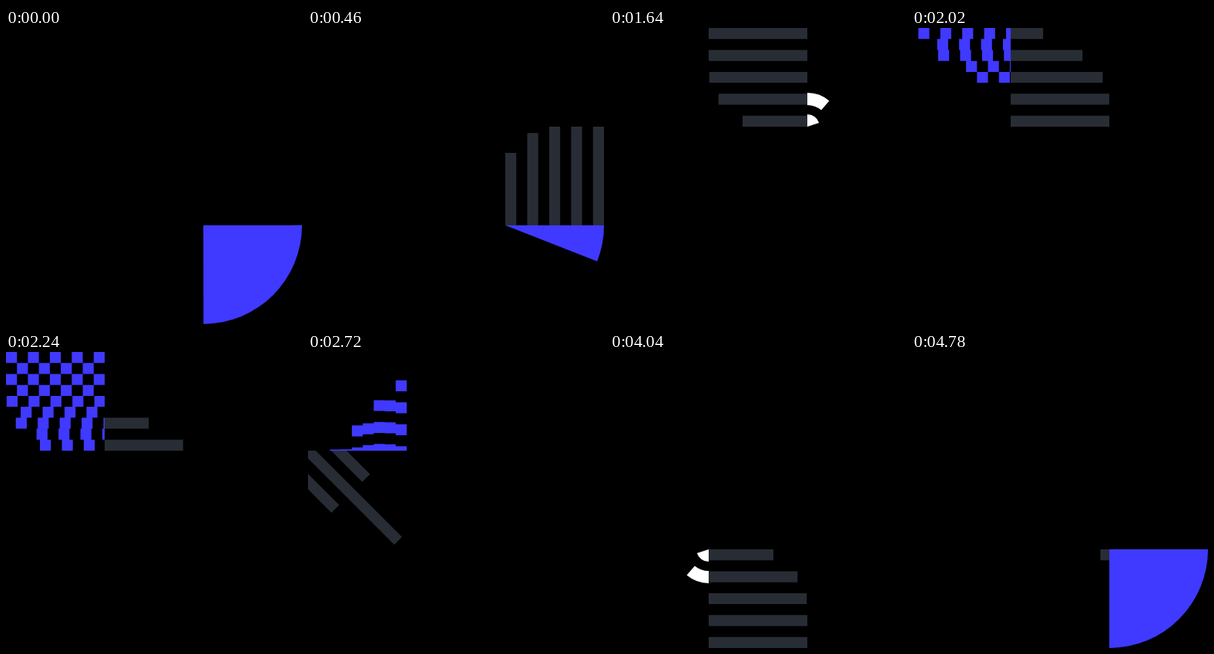
An HTML page for the animation above (4800 ms loop, 384 by 384 pixels).

```html
<!DOCTYPE html>
<html lang="en">
<head>
<meta charset="utf-8">
<title>Shape relay</title>
<style>
html, body { margin: 0; width: 100%; height: 100%; overflow: hidden; background: #000; }
svg { display: block; width: 100vw; height: 100vh; }
</style>
</head>
<body>
<svg viewBox="0 0 384 384">
  <clipPath id="cell"><rect x="0" y="128" width="128" height="128"/></clipPath>
  <path id="dark" fill="#282d35"/>
  <path id="stripes" fill="#282d35" clip-path="url(#cell)"/>
  <path id="white" fill="#fff"/>
  <path id="blue" fill="#4039ff"/>
</svg>
<script>
const LOOP = 4800, STEP = 600, SIZE = 128, UNIT = SIZE / 9, SPAN = 320;
const clamp = (v, lo, hi) => Math.min(hi, Math.max(lo, v));
const bez = (s, a, b) => 3 * (1 - s) * (1 - s) * s * a + 3 * (1 - s) * s * s * b + s * s * s;

// accelerating curve for leaving; entering uses its mirror
function leave(u) {
  if (u <= 0) return 0;
  if (u >= 1) return 1;
  let lo = 0, hi = 1;
  for (let i = 0; i < 24; i++) {
    const mid = (lo + hi) / 2;
    if (bez(mid, 0.62, 0.8) < u) lo = mid; else hi = mid;
  }
  return Math.max(0, bez(lo, -0.02, 0.74));
}
const enter = u => 1 - leave(1 - u);

// time relative to the moment when cell k is fully shown
const local = (t, k) => {
  const d = (t - k * STEP + LOOP) % LOOP;
  return d >= LOOP / 2 ? d - LOOP : d;
};

// [tail, head] of lane i of five; the outer lane leads
function lane(time, i) {
  const lag = (4 - i) * 80;
  return [leave((time + 40 - lag) / SPAN), enter((time + 600 - lag) / SPAN)];
}

const poly = pts => 'M' + pts.map(p => p[0].toFixed(3) + ' ' + p[1].toFixed(3)).join('L') + 'Z';
const box = (x0, y0, x1, y1) =>
  x1 - x0 < 1e-3 || y1 - y0 < 1e-3 ? '' : poly([[x0, y0], [x1, y0], [x1, y1], [x0, y1]]);

// ring piece sweeping counter-clockwise over a quarter turn from angle `from`
function ring(cx, cy, r0, r1, from, [tail, head]) {
  if (head - tail < 1e-4) return '';
  const at = (r, f) => {
    const a = (from - 90 * f) * Math.PI / 180;
    return (cx + r * Math.cos(a)).toFixed(3) + ' ' + (cy + r * Math.sin(a)).toFixed(3);
  };
  return `M${at(r0, tail)}L${at(r1, tail)}A${r1} ${r1} 0 0 0 ${at(r1, head)}L${at(r0, head)}` +
    (r0 ? `A${r0} ${r0} 0 0 1 ${at(r0, tail)}` : '') + 'Z';
}

function arcs(time, cx, cy, from) {
  let d = '';
  for (let i = 0; i < 5; i++) d += ring(cx, cy, i * 28, i * 28 + 16, from, lane(time, i));
  return d;
}

function bars(time, draw) {
  let d = '';
  for (let i = 0; i < 5; i++) {
    const [tail, head] = lane(time, i);
    d += draw(i * 2 * UNIT, tail * SIZE, head * SIZE);
  }
  return d;
}

// rows slide in from the right, columns drop out downwards
function checker(time) {
  let d = '';
  for (let r = 0; r < 9; r++) {
    const dx = SIZE * (1 - enter((time + 600 - r * 40) / SPAN));
    for (let c = r % 2; c < 9; c += 2) {
      const dy = SIZE * leave((time + 40 - c * 22) / SPAN);
      const x = c * UNIT + dx, y = r * UNIT + dy;
      d += box(x, y, Math.min(SIZE, x + UNIT), Math.min(SIZE, y + UNIT));
    }
  }
  return d;
}

// diagonals run down-right, the middle one first
function diagonals(time) {
  let d = '';
  for (let n = -3; n <= 3; n++) {
    const k = n * 40, lag = Math.abs(n) * 120;
    const tail = leave((time + 10 - lag) / SPAN), head = enter((time + 472 - lag) / SPAN);
    if (head - tail < 1e-4) continue;
    const len = SIZE - Math.abs(k) + 10;
    const x = Math.max(k, 0) - 5, y = SIZE + Math.max(-k, 0) - 5;
    const a = tail > 0 ? tail * len : -10, b = head < 1 ? head * len : len + 10;
    d += poly([[x + a + 5, y + a - 5], [x + b + 5, y + b - 5],
               [x + b - 5, y + b + 5], [x + a - 5, y + a + 5]]);
  }
  return d;
}

const set = (id, d) => document.getElementById(id).setAttribute('d', d);

function render(t) {
  const at = k => local(t, k);
  const disc = [leave((at(0) + 40) / 581), enter((at(0) + 600) / 610)];
  set('blue', ring(256, 256, 0, SIZE, 90, disc) + checker(at(4)));
  set('white', arcs(at(2), 256, 128, 0) + arcs(at(6), 128, 256, 180));
  set('dark',
    bars(at(1), (o, a, b) => box(256 + o, 256 - b, 256 + o + UNIT, 256 - a)) +
    bars(at(3), (o, a, b) => box(256 - b, SIZE - o - UNIT, 256 - a, SIZE - o)) +
    bars(at(7), (o, a, b) => box(128 + a, 256 + o, 128 + b, 256 + o + UNIT)));
  set('stripes', diagonals(at(5)));
}

const start = performance.now();
function tick(now) {
  render(Math.max(0, now - start) % LOOP);
  requestAnimationFrame(tick);
}
render(0);
requestAnimationFrame(tick);
</script>
</body>
</html>
```
